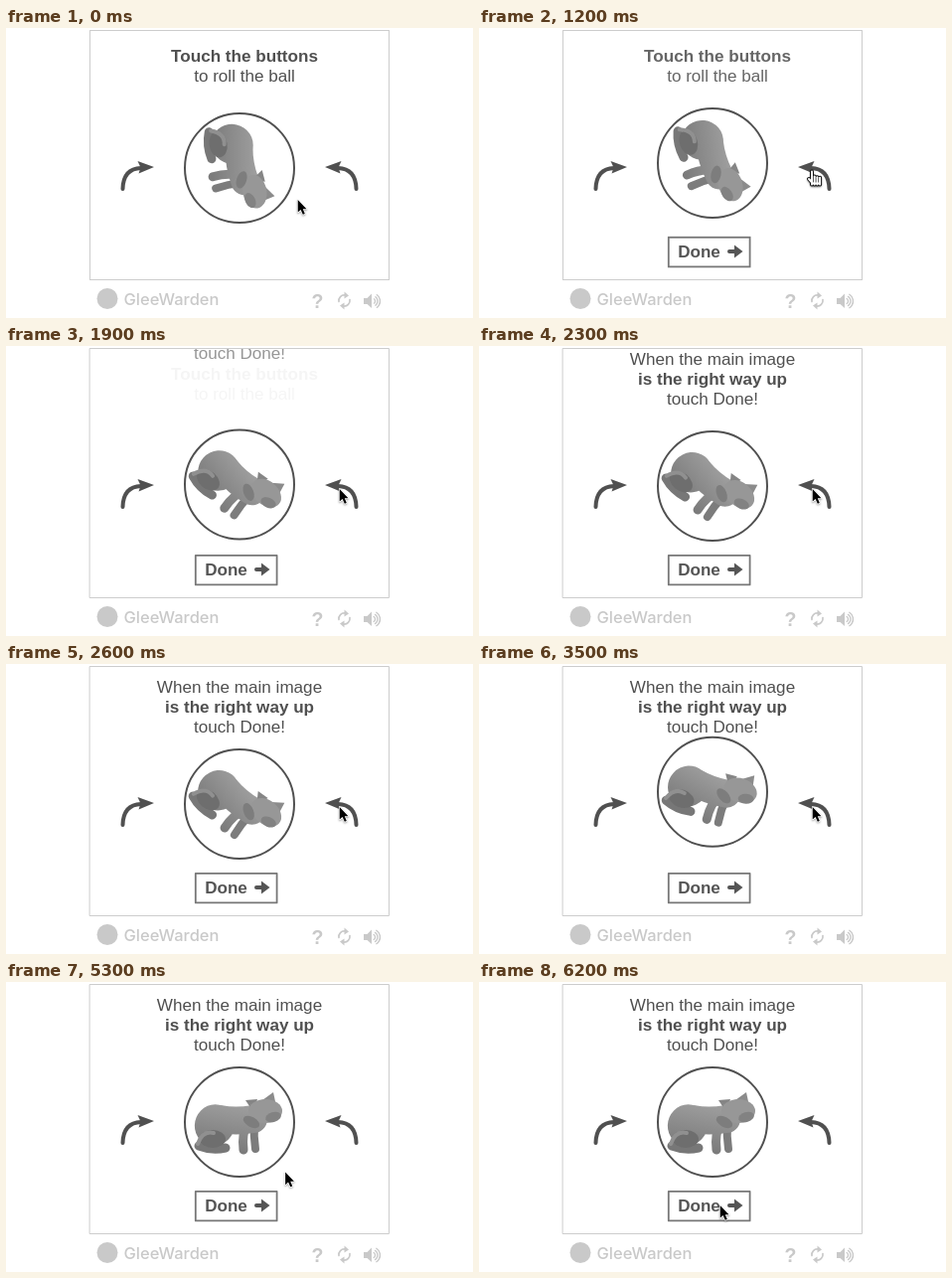
An HTML page with a canvas that plays this animation: 470x292 px, repeating every 6400 ms.

```html
<!DOCTYPE html>
<html lang="en">
<head>
<meta charset="utf-8">
<title>Roll the ball</title>
<style>
  html, body { margin: 0; width: 100%; height: 100%; overflow: hidden; background: #fff; }
  canvas { display: block; }
</style>
</head>
<body>
<canvas id="stage" width="470" height="292"></canvas>
<script>
const ctx = document.getElementById('stage').getContext('2d');
const LOOP = 6400, STEP = 100;
const CLICKS = [1100, 3200];
const INK = '#505050', PALE = '#c9c9c9';

const clamp = v => Math.max(0, Math.min(1, v));
const span = (t, from, to) => clamp((t - from) / (to - from));
const easeOut = p => 1 - (1 - p) * (1 - p);
const mix = (a, b, p) => a + (b - a) * p;

// Runs a drawing with its own origin, turn and horizontal scale
function at(x, y, paint, turn = 0, flip = 1) {
  ctx.save();
  ctx.translate(x, y);
  ctx.rotate(turn);
  ctx.scale(flip, 1);
  paint();
  ctx.restore();
}

function text(str, x, y, weight, color = INK, size = 17.1) {
  ctx.font = `${weight} ${size}px "Liberation Sans", Arial, sans-serif`;
  ctx.textAlign = 'center';
  ctx.fillStyle = color;
  ctx.fillText(str, x, y);
}

function shape(path, color) {
  ctx.fillStyle = color;
  ctx.fill(new Path2D(path));
}

function line(path, width, color) {
  ctx.lineCap = ctx.lineJoin = 'round';
  ctx.lineWidth = width;
  ctx.strokeStyle = color;
  ctx.stroke(new Path2D(path));
}

function oval(x, y, rx, ry, color, tilt = 0) {
  ctx.beginPath();
  ctx.ellipse(x, y, rx, ry, tilt, 0, 7);
  ctx.fillStyle = color;
  ctx.fill();
}

function turnArrow() {
  line('M-117.5 21.5 Q-117 1 -99 .5', 4, INK);
  shape('M-86 -.5 L-102.5 -6.5 L-99.5 0 L-101.5 6 Z', INK);
}

function footer() {
  oval(102, 272.5, 10.5, 10.5, PALE);
  ctx.font = '500 16.5px Inter, sans-serif';
  ctx.textAlign = 'left';
  ctx.fillText('GleeWarden', 118.5, 279);
  text('?', 313.5, 281.5, 'bold', PALE, 19.5);

  for (const turn of [0, Math.PI]) {
    at(340.5, 274.5, () => {
      line('M-5.5 1 A5.5 5.5 0 0 1 1 -5.4', 1.7, PALE);
      shape('M0 -9 L4.5 -5 L0 -2 Z', PALE);
    }, turn);
  }

  shape('M360 272 H363.5 L368 267.5 V282 L363.5 278 H360 Z', PALE);
  for (let r = 3; r <= 8; r += 2.5) {
    ctx.beginPath();
    ctx.arc(368.5, 275, r, -1, 1);
    ctx.lineWidth = 1.4;
    ctx.strokeStyle = PALE;
    ctx.stroke();
  }
}

function cat() {
  const fur = ctx.createLinearGradient(0, -20, -10, 32);
  fur.addColorStop(0, '#a0a0a0');
  fur.addColorStop(1, '#787878');

  line('M-41 24 Q-28 29 -14 26', 9, '#777');
  line('M15 2 Q14 14 16 27', 8, '#7c7c7c');
  line('M8 0 Q2 12 4 28', 9, fur);
  oval(-25, 3, 20, 21, fur, 0.4);
  line('M-20 -3 Q-4 0 14 -3', 28, fur);
  oval(-27, 17, 13, 9, '#6e6e6e');
  line('M-42 22 Q-37 8 -26 11', 4, '#909090');

  shape('M6 -22 L18 -23 L14 -10 Z', '#858585');
  shape('M23 -22 L34 -30 L37 -16 Z', '#8b8b8b');
  oval(26, -11, 17, 12, '#979797');
  oval(12, 0, 9, 5, '#7d7d7d', 0.5);
  oval(34, -5, 8, 5, '#828282', -0.3);
}

function ball(t) {
  let angle = 80, lift = 0;
  for (const c of CLICKS) {
    angle -= 40 * Math.sin(span(t, c, c + 900) * Math.PI / 2);
    lift += 13.5 * Math.sin(span(t, c, c + 830) * Math.PI);
  }
  at(235, 141 - lift, () => {
    ctx.beginPath();
    ctx.arc(0, 0, 55, 0, 7);
    ctx.lineWidth = 2;
    ctx.strokeStyle = INK;
    ctx.stroke();
    ctx.rotate(angle * Math.PI / 180);
    cat();
  });
}

function captions(t) {
  ctx.save();
  ctx.beginPath();
  ctx.rect(85, 3, 300, 250);
  ctx.clip();
  ctx.globalAlpha = 1 - span(t, 1100, 1950);
  text('Touch the buttons', 240, 34, 'bold');
  text('to roll the ball', 240, 54, 'normal');
  ctx.globalAlpha = span(t, 1750, 2000);
  ctx.translate(0, -73 * (1 - easeOut(span(t, 1800, 2600))));
  text('When the main image', 235, 29, 'normal');
  text('is the right way up', 235, 49, 'bold');
  text('touch Done!', 235, 69, 'normal');
  ctx.restore();
}

function doneButton() {
  ctx.lineWidth = 1.8;
  ctx.strokeStyle = '#777';
  ctx.strokeRect(190.8, 210.8, 81.8, 29.6);
  text('Done', 221.5, 231, 'bold', '#555');
  line('M252 225 H258', 4, '#555');
  shape('M257 218.5 L265.5 225 L257 231.5 Z', '#555');
}

function arrowPointer() {
  const outline = 'M.7 1 V13.6 L3.6 11 L5.8 15.8 L7.8 15 L5.8 10.2 H9.5 Z';
  line(outline, 1.5, '#fff');
  ctx.shadowColor = 'transparent';
  shape(outline, '#000');
}

// Black strokes first, then thinner white ones leave an outline
function handPointer() {
  for (const [color, width] of [['#111', 4], ['#fff', 2]]) {
    line('M-3 9 L1 13.5 H7', width, color);
    for (let i = 0; i < 4; i++) {
      line(`M${i * 2.7} ${i ? 6 + i * 0.6 : 1.5} V14.5`, width, color);
    }
    ctx.shadowColor = 'transparent';
  }
}

function pointer(t) {
  const a = easeOut(span(t, 0, 900)), b = easeOut(span(t, 4800, 6200));
  const x = mix(293, 335, a) - 93 * b;
  const y = mix(172, 143, a) + 81 * b;
  at(x, y, () => {
    ctx.shadowColor = 'rgba(0,0,0,.35)';
    ctx.shadowBlur = 2;
    ctx.shadowOffsetY = 1;
    if (t >= 1000 && t < 1500) handPointer();
    else arrowPointer();
  });
}

function draw(t) {
  ctx.fillStyle = '#fff';
  ctx.fillRect(0, 0, 470, 292);
  ctx.lineWidth = 1;
  ctx.strokeStyle = '#cdcdcd';
  ctx.strokeRect(84.5, 2.5, 301, 251);
  captions(t);
  for (const side of [1, -1]) at(235, 140.5, turnArrow, 0, side);
  ball(t);
  if (t >= 1200) doneButton();
  footer();
  pointer(t);
}

const start = performance.now();
function tick() {
  const t = (performance.now() - start) % LOOP;
  draw(Math.floor(t / STEP) * STEP);
  requestAnimationFrame(tick);
}
tick();
</script>
</body>
</html>
```
